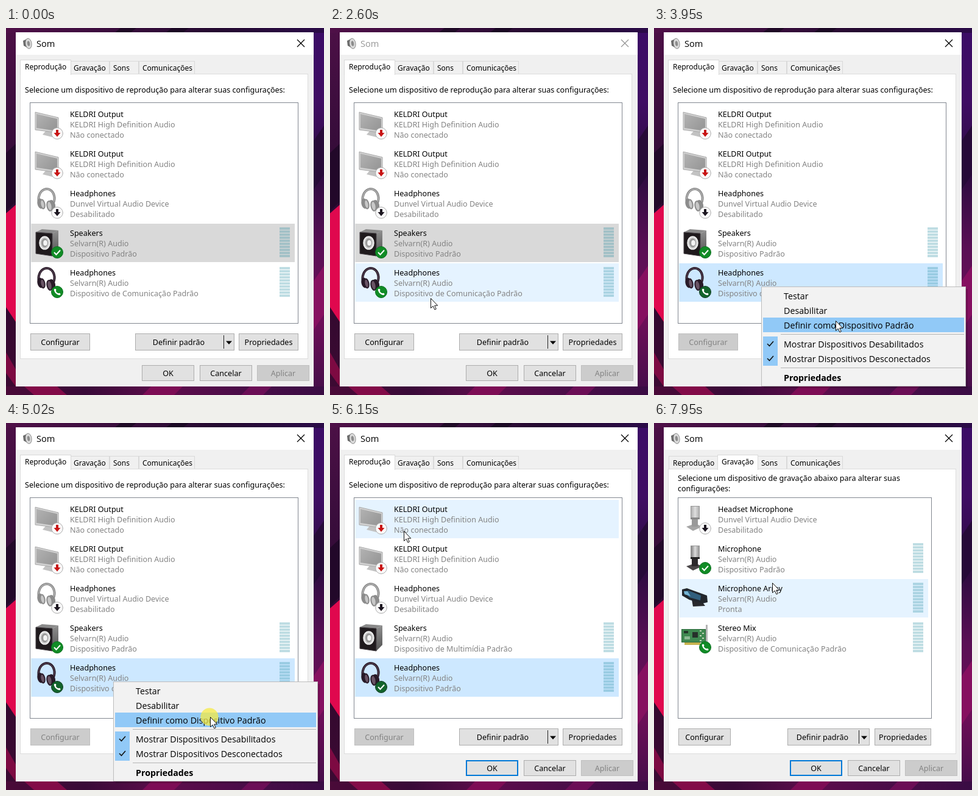
An HTML page with a canvas that plays this animation: 522x602 px, repeating every 8000 ms.

```html
<!DOCTYPE html>
<html lang="pt">
<head>
<meta charset="utf-8">
<title>Som</title>
<style>
html, body { margin: 0; width: 100%; height: 100%; overflow: hidden; background: #260a30; }
canvas { display: block; width: 522px; height: 602px; }
</style>
</head>
<body>
<canvas id="stage"></canvas>
<script>
const LOOP = 8000, W = 522, H = 602;
const canvas = document.getElementById('stage');
const dpr = window.devicePixelRatio || 1;
canvas.width = W * dpr;
canvas.height = H * dpr;
const c = canvas.getContext('2d');
c.scale(dpr, dpr);

const UI = '12.56px "Noto Sans", "Open Sans", sans-serif';
const TAB = '12px "Noto Sans", "Open Sans", sans-serif';
const MENU = '14.25px "Open Sans", "Noto Sans", sans-serif';
const TITLE = '14.6px "Open Sans", "Noto Sans", sans-serif';
const GREY = '#838383', BLUE = '#0078d7', TICK = '#91c9f7', CHOSEN = '#cde8ff';

const clamp = v => Math.max(0, Math.min(1, v));
const ramp = (t, a, b) => clamp((t - a) / (b - a));

function rect(x, y, w, h, fill, line) {
  c.fillStyle = fill;
  c.fillRect(x, y, w, h);
  if (line) {
    c.strokeStyle = line;
    c.lineWidth = 1;
    c.strokeRect(x + .5, y + .5, w - 1, h - 1);
  }
}

function shape(points, fill, line, width = 1) {
  c.beginPath();
  for (let i = 0; i < points.length; i += 2) c.lineTo(points[i], points[i + 1]);
  if (fill) { c.closePath(); c.fillStyle = fill; c.fill(); }
  if (line) { c.strokeStyle = line; c.lineWidth = width; c.stroke(); }
}

function oval(x, y, rx, ry, fill, line, width = 1, turn = 0) {
  c.beginPath();
  c.ellipse(x, y, rx, ry, turn, 0, 7);
  if (fill) { c.fillStyle = fill; c.fill(); }
  if (line) { c.strokeStyle = line; c.lineWidth = width; c.stroke(); }
}

function text(s, x, y, color = '#000', font = UI, align = 'left') {
  c.font = font;
  c.textAlign = align;
  c.fillStyle = color;
  c.fillText(s, x, y);
}

function blend(stops, x0, y0, x1, y1) {
  const g = c.createLinearGradient(x0, y0, x1, y1);
  stops.forEach((s, i) => g.addColorStop(i / (stops.length - 1), s));
  return g;
}

// Pointer route: time, x, y
const route = [
  [270, 150, 640], [610, 140, 461], [1005, 140, 461], [1010, 141, 418],
  [1470, 150, 428], [2200, 150, 428], [2340, 62, 432], [2500, 207, 434],
  [2600, 165, 443], [2990, 86, 424], [3080, 86, 424], [3150, 176, 424],
  [3490, 176, 424], [3950, 298, 480], [4090, 298, 480], [4550, 335, 482],
  [5880, 335, 482], [6150, 121, 177], [6680, 137, 62], [7270, 137, 62],
  [7950, 194, 262]
];

function pointerAt(t) {
  if (t < route[0][0]) return { x: -50, y: -50 };
  let i = 0;
  while (i < route.length - 2 && t >= route[i + 1][0]) i++;
  const [t0, x0, y0] = route[i], [t1, x1, y1] = route[i + 1];
  let k = ramp(t, t0, t1);
  k = k * k * (3 - 2 * k);
  return { x: x0 + (x1 - x0) * k, y: y0 + (y1 - y0) * k };
}

function wallpaper() {
  // top edge
  rect(0, 0, W, 8, blend(['#4f1048', '#3a0d3d', '#240a30', '#2b0b48'], 0, 0, W, 0));
  shape([188, 0, 214, 0, 204, 8, 178, 8], '#1f0926');
  shape([272, 0, 300, 0, 290, 8, 262, 8], '#1b0824');
  // left edge
  rect(0, 8, 16, H - 8, blend(['#4c1046', '#3a0d3c', '#2d0a33', '#33092f', '#3d0a33'], 0, 0, 0, H));
  shape([0, 205, 16, 190, 16, 285, 0, 300], '#220829');
  shape([0, 304, 16, 290, 16, 482, 0, 458], '#e0084e');
  shape([0, 532, 16, 560, 16, 588, 0, 566], '#7d0a42');
  // right edge
  rect(505, 8, 17, H - 8, blend(['#3b0c66', '#3f0d63', '#2c0b40', '#5a0f55', '#6d0f58', '#420d48'], 0, 0, 0, H));
  shape([505, 185, 522, 160, 522, 240, 505, 265], '#260a38');
  shape([505, 415, 522, 390, 522, 470, 505, 495], '#861060');
  // bottom edge
  rect(0, 588, W, 14, blend(['#4a0a38', '#390a38', '#5e0d4c', '#4a0d48', '#3a0c44'], 0, 0, W, 0));
  shape([30, 588, 84, 588, 100, 602, 46, 602], '#820b48');
  shape([238, 588, 290, 588, 276, 602, 224, 602], '#7d0d55');
  shape([400, 588, 436, 588, 422, 602, 386, 602], '#6b0e56');
}

function badge(y, kind, dark) {
  const x = 84;
  if (kind === 'red' || kind === 'black') {
    oval(x, y, 9.3, 9.3, '#fafafa', '#aaa');
    const ink = kind === 'red' ? '#c81414' : '#1c1620';
    rect(x - 2, y - 6, 4, 6, ink);
    shape([x - 5.5, y - 1, x + 5.5, y - 1, x, y + 5.5], ink);
    return;
  }
  oval(x, y, 9.5, 9.5, dark ? '#12642c' : '#118c26', dark ? '#123b25' : '#0b7020');
  if (kind === 'check') {
    shape([x - 5, y, x - 1.5, y + 3.7, x + 5, y - 3.5], null, '#fff', 2);
  } else {
    c.lineCap = 'round';
    c.beginPath();
    c.moveTo(x - 4, y - 4);
    c.quadraticCurveTo(x - 3, y + 3, x + 4, y + 4);
    c.strokeStyle = '#fff';
    c.lineWidth = 2.2;
    c.stroke();
    oval(x - 3.4, y - 3.3, 1.8, 2, '#fff');
    oval(x + 3.4, y + 3.5, 2, 1.8, '#fff');
    c.lineCap = 'butt';
  }
}

// Icons are drawn from the top of their row.
const icons = {
  monitor(y) {
    shape([66, y + 42, 72, y + 43, 82, y + 49, 76, y + 53, 60, y + 49], '#c2c2c2');
    shape([48, y + 12, 86, y + 21, 86, y + 46, 48, y + 41], '#d2d2d2', '#a8a8a8');
    shape([50, y + 15, 84, y + 23, 84, y + 43, 50, y + 38],
      blend(['#b2b2b2', '#959595'], 50, y + 15, 80, y + 44));
  },
  phones(y, dark) {
    const ink = dark ? '#281a28' : '#8c8c8c', shine = dark ? '#6a5566' : '#c8c8c8';
    c.beginPath();
    c.ellipse(66.5, y + 24, 13, 16, .1, 2.7, 6.7);
    c.strokeStyle = ink;
    c.lineWidth = 4;
    c.stroke();
    c.strokeStyle = shine;
    c.lineWidth = 1;
    c.stroke();
    oval(56.5, y + 32, 5, 8.5, ink, null, 1, -.2);
    oval(60, y + 33, 3.5, 7.5, shine, ink, 2, -.2);
    oval(75, y + 35, 6, 9, ink, null, 1, -.2);
    oval(71.5, y + 36, 4, 8, shine, ink, 2, -.2);
  },
  speaker(y) {
    shape([49, y + 14, 59, y + 9, 86, y + 11, 76, y + 16], '#8a8a8a');
    shape([76, y + 16, 86, y + 11, 86, y + 43, 76, y + 53],
      blend(['#a0a0a0', '#5c5c5c'], 76, y, 87, y + 45));
    shape([49, y + 14, 76, y + 16, 76, y + 53, 49, y + 49], '#1f1a1d', '#4a454a');
    oval(63.5, y + 31.5, 8.5, 10.5, '#d6d6d6', '#f4f4f4', 1.5);
    oval(63.5, y + 31.5, 5.5, 7.5, '#9a9a9a');
    oval(64.5, y + 31.5, 3.3, 4.6, '#f4f4f4');
  },
  mic(y, dark) {
    shape([53, y + 44, 68, y + 39, 79, y + 44, 64, y + 51], dark ? '#4a4648' : '#a5a5a5');
    rect(62, y + 28, 10, 16, dark ? '#2b282b' : '#999');
    rect(60, y + 10, 15, 21,
      blend(dark ? ['#777', '#dadada', '#8b8b8b'] : ['#aaa', '#dedede', '#aaa'], 60, 0, 75, 0), '#989898');
    rect(60, y + 29, 15, 3, dark ? '#222' : '#888');
  },
  array(y) {
    shape([62, y + 34, 78, y + 36, 84, y + 44, 64, y + 45], '#29292c');
    shape([46, y + 17, 54, y + 15, 87, y + 27, 88, y + 38, 80, y + 40, 58, y + 34, 46, y + 27], '#22262c');
    shape([49, y + 20, 57, y + 19, 77, y + 27, 76, y + 35, 58, y + 30], '#315f7d');
    shape([49, y + 20, 55, y + 20, 60, y + 28, 50, y + 25], '#75b5d5');
  },
  card(y) {
    rect(85, y + 10, 3, 35, '#b5b5b5');
    rect(45, y + 17, 40, 22, '#3f8951', '#2d6a3b');
    rect(50, y + 39, 26, 4, '#c6b34e');
    rect(63, y + 22, 9, 9, '#26302a');
    rect(49, y + 20, 7, 4, '#23382a');
    rect(50, y + 29, 9, 5, '#8cba94');
    for (let i = 0; i < 5; i++) rect(75 + i % 2 * 4, y + 19 + i * 4, 3, 2, '#c3d4b8');
  }
};

const chip = 'Selvarn(R) Audio', headset = 'Dunvel Virtual Audio Device';
const off = 'Não conectado', std = 'Dispositivo Padrão', comm = 'Dispositivo de Comunicação Padrão';
const screen = ['monitor', 'KELDRI Output', 'KELDRI High Definition Audio', off, 'red'];

const playRows = changed => [
  screen, screen,
  ['phones', 'Headphones', headset, 'Desabilitado', 'black'],
  ['speaker', 'Speakers', chip, changed ? 'Dispositivo de Multimídia Padrão' : std, changed ? '' : 'check', 1],
  ['phones', 'Headphones', chip, changed ? std : comm, changed ? 'check' : 'call', 1]
];
const recordRows = [
  ['mic', 'Headset Microphone', headset, 'Desabilitado', 'black'],
  ['mic', 'Microphone', chip, std, 'check', 1],
  ['array', 'Microphone Array', chip, 'Pronta', '', 1],
  ['card', 'Stereo Mix', chip, comm, 'call', 1]
];

function list(rows, right, selected, selColor, p, canHover) {
  rect(39, 122, right - 39, 363, '#fff', '#828790');
  const end = right - 6;
  rows.forEach(([icon, name, device, state, mark, live], i) => {
    const y = 126 + 65 * i, chosen = i === selected;
    const over = canHover && p.x >= 41 && p.x < end && p.y >= y && p.y < y + 63;
    if (chosen) rect(41, y, end - 41, 63, selColor);
    else if (over) rect(41, y, end - 41, 63, '#e5f3ff');
    icons[icon](y, live);
    if (mark) badge(y + 47, mark, chosen && selColor === CHOSEN);
    text(name, 105, y + 20);
    text(device, 105, y + 37, GREY);
    text(state, 105, y + 54, GREY);
    if (live) for (let k = 0; k < 10; k++) rect(end - 25, y + 6 + 5 * k, 17, 4, 'rgba(0,120,145,.25)');
  });
}

function button(label, x, y, w, h, mode, textX = x + w / 2) {
  const dim = mode === 'dim';
  rect(x, y, w, h, dim ? '#ccc' : '#e1e1e1', dim ? '#bfbfbf' : '#adadad');
  if (mode === 'main') {
    c.strokeStyle = BLUE;
    c.lineWidth = 2;
    c.strokeRect(x + 1, y + 1, w - 2, h - 2);
  }
  text(label, textX, y + h / 2 + 5, dim ? GREY : '#000', UI, 'center');
}

function splitButton(x, w, split, textX) {
  button('Definir padrão', x, 501, w, 28, '', textX);
  rect(split, 504, 1, 22, '#222');
  const m = (split + x + w) / 2;
  shape([m - 5, 513.5, m + 5, 513.5, m, 519], '#000');
}

function tabs(active, p) {
  const names = ['Reprodução', 'Gravação', 'Sons', 'Comunicações'];
  const edge = [24, 106, 170, 218, 310], left = [31, 111, 176, 224];
  const drawTab = i => {
    const on = i === active, x = Math.max(23, edge[i] - (on ? 2 : 0)), w = edge[i + 1] - x + (on ? 1 : 0);
    const over = !on && p.x > x && p.x < x + w && p.y > 54 && p.y < 75;
    rect(x, on ? 52 : 54, w, on ? 25 : 22, on ? '#fff' : over ? '#d8eaf9' : '#f0f0f0', '#d9d9d9');
    if (on) rect(x + 1, 74, w - 2, 4, '#fff');
    text(names[i], left[i], on ? 68 : 70, '#000', TAB);
  };
  names.forEach((_, i) => i !== active && drawTab(i));
  rect(23, 75, 473, 468, '#fff', '#dcdcdc');
  drawTab(active);
}

function titleBar(focus) {
  rect(16, 7, 489, 37, '#fff');
  shape([28, 21, 36, 17, 38, 34, 29, 29], '#6a6a6a');
  oval(37, 25.5, 5, 8.5, '#dcdcdc', '#8a8a8a', 1, -.15);
  oval(37, 25.5, 2.2, 4.2, '#8c8c8c', null, 1, -.15);
  const v = Math.round(150 * (1 - focus)), ink = `rgb(${v},${v},${v})`;
  text('Som', 50, 31, ink, TITLE);
  shape([478, 19, 490, 31], null, ink, 1.2);
  shape([490, 19, 478, 31], null, ink, 1.2);
}

function menu(alpha, p) {
  if (alpha <= 0) return;
  c.globalAlpha = alpha;
  rect(180, 428, 335, 163, 'rgba(0,0,0,.16)');
  rect(176, 424, 336, 164, '#f2f2f2', '#bdbdbd');
  const top = 427, row = 24;
  const hot = Math.floor((p.y - top) / row);
  if (p.x > 179 && hot >= 0 && hot < 3) rect(179, top + row * hot, 330, row, TICK);
  ['Testar', 'Desabilitar', 'Definir como Dispositivo Padrão'].forEach((s, i) => text(s, 213, 445 + row * i, '#000', MENU));
  rect(208, 502, 301, 1, '#b5b5b5');
  ['Desabilitados', 'Desconectados'].forEach((s, i) => {
    const y = 506 + row * i;
    rect(179, y, row, row, TICK);
    shape([186, y + 12, 189.5, y + 15.5, 196, y + 8], null, '#111', 1.6);
    text('Mostrar Dispositivos ' + s, 213, y + 18, '#000', MENU);
  });
  rect(208, 557, 301, 1, '#b5b5b5');
  text('Propriedades', 213, 579, '#000', 'bold ' + MENU);
  c.globalAlpha = 1;
}

function pointer({ x, y }) {
  c.save();
  c.translate(x + .5, y + .5);
  c.lineJoin = 'miter';
  shape([0, 0, 0, 16, 3.7, 12.6, 6.4, 18.5, 8.8, 17.4, 6.2, 11.7, 11.2, 11.7, 0, 0], '#fff', '#111', 1);
  c.restore();
}

function draw(t) {
  const p = pointerAt(t);
  const recording = t >= 7010;
  const active = t < 270 || t >= 3290;
  const focus = t < 3000 ? 1 - ramp(t, 270, 400) : ramp(t, 3280, 3340);
  const lit = active && t >= 70;
  const menuAlpha = t < 5000 ? ramp(t, 3360, 3460) : 1 - ramp(t, 5490, 5680);
  const clicking = (t >= 5020 && t < 5490) || (t >= 7010 && t < 7070);

  wallpaper();
  rect(16, 7, 489, 581, '#f0f0f0');
  titleBar(focus);
  tabs(recording ? 1 : 0, p);

  if (recording) {
    text('Selecione um dispositivo de gravação abaixo para alterar suas', 39, 95);
    text('configurações:', 39, 112);
    list(recordRows, 456, -1, '', p, true);
    button('Configurar', 40, 501, 86, 28);
    splitButton(219, 135, 336, 276.5);
    button('Propriedades', 362, 501, 93, 28);
  } else {
    text('Selecione um dispositivo de reprodução para alterar suas configurações:', 31, 106);
    list(playRows(t >= 5620), 480, t < 3290 ? 3 : 4, lit ? CHOSEN : '#d9d9d9', p, menuAlpha <= 0);
    button('Configurar', 40, 501, 98, 28, t >= 3290 ? 'dim' : '');
    splitButton(212, 163, 357, 283.5);
    button('Propriedades', 382, 501, 98, 28);
  }
  button('OK', 223, 553, 86, 26, lit ? 'main' : '');
  button('Cancelar', 318, 553, 86, 26);
  button('Aplicar', 412, 553, 86, 26, 'dim');

  menu(menuAlpha, p);
  if (clicking) oval(p.x - 1, p.y, 14.6, 14.6, 'rgba(245,233,70,.75)');
  pointer(p);
}

const start = performance.now();
function tick() {
  draw((performance.now() - start) % LOOP);
  requestAnimationFrame(tick);
}
tick();
</script>
</body>
</html>
```
